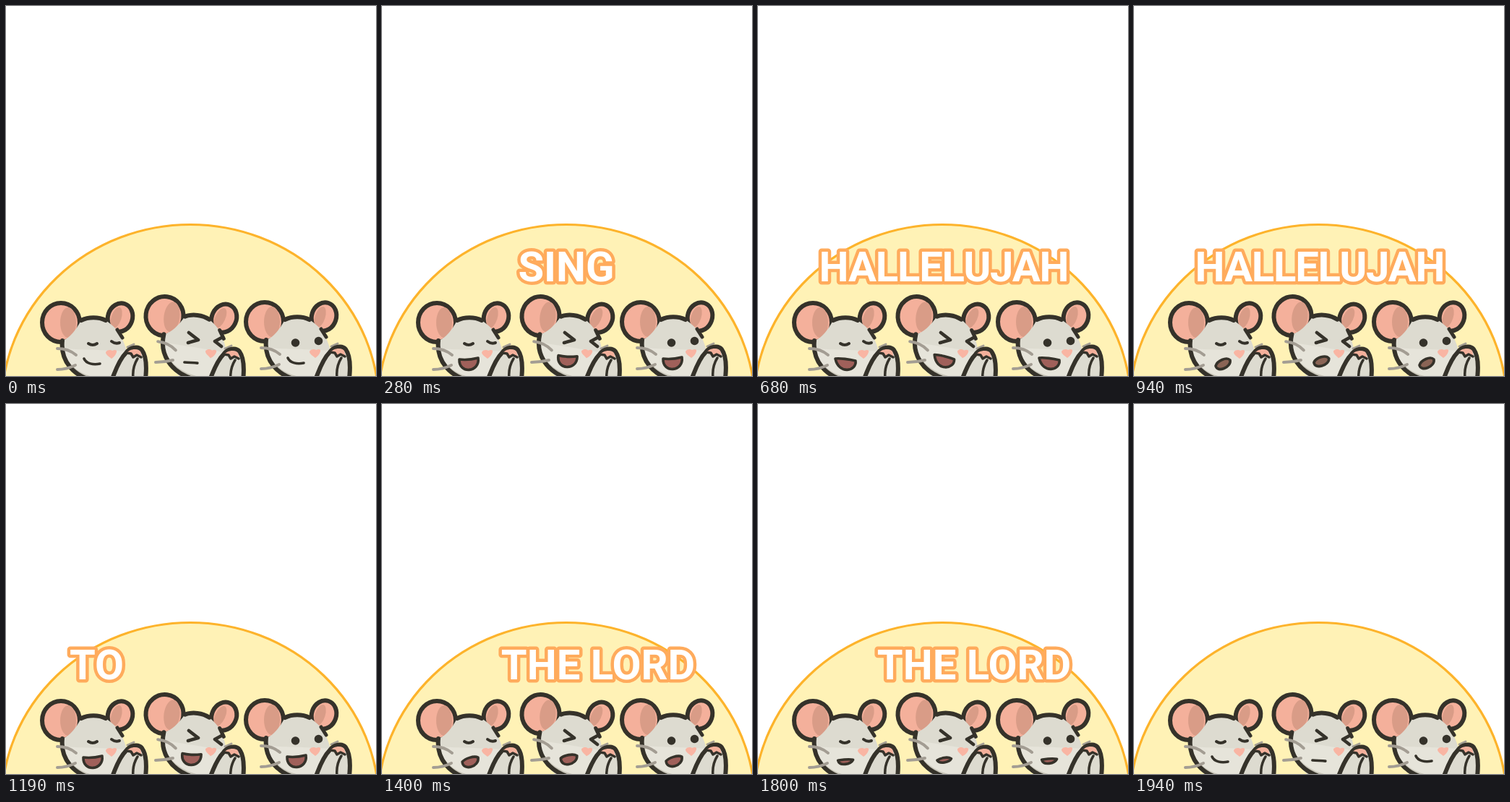
An HTML page without scripts that plays this animation: 512 by 512 pixels, repeating every 1.99 s.

```html
<!DOCTYPE html>
<html lang="en">
<head>
<meta charset="utf-8">
<title>Singing mice</title>
<style>
html, body { margin: 0; width: 100%; height: 100%; overflow: hidden; background: #fff; }
svg { display: block; width: 100vw; height: 100vh; }

.ink { fill: none; stroke: #35322a; stroke-width: 6; stroke-linecap: round; stroke-linejoin: round; }
.fine { stroke-width: 4; }
.pink { fill: #f4b09b; }
.shade { fill: #d99c87; }
.fur { fill: #dddbd0; }
.hair { fill: none; stroke: #a39d93; stroke-width: 4; stroke-linecap: round; }

.word {
  font: 700 58px Roboto, "Liberation Sans", Arial, sans-serif;
  text-anchor: middle;
  fill: #fff; stroke: #ffab5c; stroke-width: 9; stroke-linejoin: round;
  paint-order: stroke;
  opacity: 0;
  animation: 1990ms step-end infinite;
}
.sing { animation-name: sing; }
.praise { animation-name: praise; letter-spacing: -1.2px; }
.to { animation-name: to; }
.lord { animation-name: lord; }
@keyframes sing { 0% { opacity: 0 } 3.52% { opacity: 1 } 30.65%, 100% { opacity: 0 } }
@keyframes praise { 0% { opacity: 0 } 30.65% { opacity: 1 } 57.29%, 100% { opacity: 0 } }
@keyframes to { 0% { opacity: 0 } 57.29% { opacity: 1 } 70.35%, 100% { opacity: 0 } }
@keyframes lord { 0% { opacity: 0 } 70.35% { opacity: 1 } 94%, 100% { opacity: 0 } }

.mouth {
  --shut: path("M108 488C111 495 121 497 130 495C121 497 111 495 108 488Z");
  --grin: path("M107 489C115 490 125 489 133 487C136 507 106 510 107 489Z");
  --wide: path("M107 488C113 487 127 489 135 491C137 505 112 511 107 488Z");
  --round: path("M113 498C115 491 128 485 133 490C135 500 115 508 113 498Z");
  d: var(--shut);
  fill: #a0605a; stroke: #35322a; stroke-width: 3.6; stroke-linejoin: round;
  animation: mouth 1990ms linear infinite;
}
.flat { --shut: path("M111 498C117 498 123 497 129 497C123 497 117 498 111 498Z"); }
@keyframes mouth {
  0%, 3.5% { d: var(--shut); }
  7%, 27% { d: var(--grin); }
  30.7%, 40% { d: var(--wide); fill: #a0605a; }
  45%, 55% { d: var(--round); fill: #8a6455; }
  58%, 67% { d: var(--grin); fill: #a0605a; }
  72%, 86% { d: var(--round); }
  95.5%, 100% { d: var(--shut); }
}
</style>
</head>
<body>
<svg viewBox="0 0 512 512">
  <defs>
    <g id="head">
      <ellipse class="ink" cx="76" cy="438" rx="26" ry="27" style="fill:#f4b09b"/>
      <ellipse class="shade" cx="86" cy="438" rx="11" ry="21"/>
      <g transform="rotate(18 158 431)">
        <ellipse class="ink" cx="158" cy="431" rx="17" ry="20" style="fill:#f4b09b"/>
        <ellipse class="shade" cx="153" cy="433" rx="7" ry="15"/>
      </g>
      <path class="fur" d="M104 435C114 430 128 430 138 435C145 440 151 445 155 450C160 458 165 468 168 482L152 530H128C92 514 75 490 78 463C88 460 97 448 104 435Z"/>
      <path fill="#e6e4da" d="M78 474C100 476 128 475 167 478L152 530H128C96 514 80 494 78 474Z"/>
      <path fill="#c9c6b9" d="M79 476C85 496 101 511 130 515L128 522C96 514 80 494 79 476Z"/>
      <path class="ink" d="M104 435C114 430 128 430 138 435M78 463C75 490 92 514 128 520H150"/>
      <path class="ink" stroke-width="5" style="stroke-width:5" d="M154 448L161 459"/>
      <path fill="#f9b5a3" d="M138 479C141 475 145 476 147 477C151 475 154 476 153 479C152 483 149 486 146 488C143 485 138 483 138 479Z"/>
      <path class="hair" d="M71 474C81 474 90 477 97 483"/>
    </g>
    <path id="whisker" class="hair" d="M71 503C80 503 88 501 96 497"/>
    <g id="paws">
      <path class="hair" style="stroke-width:3" d="M168 472L177 468"/>
      <path class="ink" style="fill:#dddbd0" d="M147 516C152 502 158 488 166 480C172 472 183 470 188 476C194 484 195 498 193 516Z"/>
      <path class="pink" d="M166 481C171 474 182 473 186 478L188 486L181 483L177 487L173 482Z"/>
      <path class="ink" style="stroke-width:3.5" d="M167 480L173 481L176 486L181 483L187 486M182 488C177 496 175 505 176 515"/>
    </g>
  </defs>

  <ellipse cx="255" cy="552.5" rx="261" ry="250" fill="#fff2b6" stroke="#fdb32b" stroke-width="3.2"/>

  <g>
    <use href="#head"/>
    <use href="#whisker"/>
    <path class="ink fine" d="M114 467Q120 471 126 467M146 464Q151 468 157 466"/>
    <path class="mouth"/>
    <use href="#paws"/>
  </g>

  <g transform="translate(143.5 -9) rotate(7 75 438)">
    <use href="#head"/>
    <path class="mouth flat"/>
  </g>
  <path class="hair" d="M207 493Q219 493 231 490"/>
  <path class="ink" style="stroke-width:4.6" d="M253 452L266 462L252 466M300 458L289 464L298 471"/>
  <use href="#paws" x="135" y="2"/>

  <g transform="translate(282 -1)">
    <use href="#head"/>
    <use href="#whisker"/>
    <circle cx="118.5" cy="467" r="5.8" fill="#35322a"/>
    <circle cx="150.5" cy="464.5" r="5.8" fill="#35322a"/>
    <path class="mouth"/>
    <use href="#paws"/>
  </g>

  <text class="word sing" x="255" y="381">SING</text>
  <text class="word praise" x="257" y="381">HALLELUJAH</text>
  <text class="word to" x="125.5" y="381">TO</text>
  <text class="word lord" x="299" y="381">THE LORD</text>
</svg>
</body>
</html>
```
